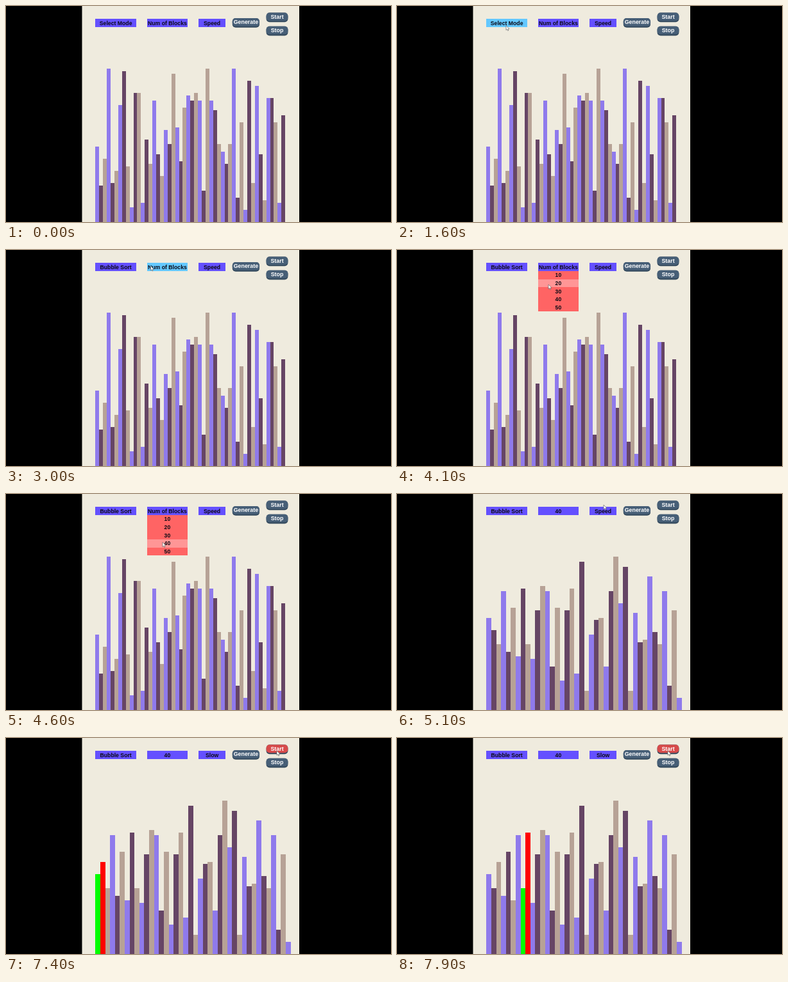
An HTML page with a canvas that plays this animation: 600x338 px, repeating every 8000 ms.

```html
<!DOCTYPE html>
<html lang="en">
<head>
<meta charset="utf-8">
<title>Sorting visualizer</title>
<style>
  html, body { margin: 0; width: 100%; height: 100%; overflow: hidden; background: #000; }
  canvas { display: block; width: 600px; height: 338px; }
</style>
</head>
<body>
<canvas id="stage" width="600" height="338"></canvas>
<script>
const ctx = document.getElementById('stage').getContext('2d');
const LOOP = 8000, FRAME = 100;

// The app is an 800 x 800 window, scaled down and centred on the stage.
const SCALE = 0.4225, LEFT = 118.3;
const px = x => LEFT + x * SCALE;
const py = y => y * SCALE;

const BAR_COLORS = ['#8f7aec', '#664565', '#b7a296'];
const HEADER = ['#6450ff', '#64c8ff'];
const OPTION = ['#ff6464', '#ff9696'];

const fifty = [31, 15, 26, 63, 16, 21, 48, 62, 23, 6, 53, 53, 8, 34, 24, 50, 28,
  19, 38, 32, 61, 39, 25, 47, 52, 50, 53, 50, 13, 63, 50, 46, 32, 29, 24, 32, 63,
  10, 41, 5, 58, 16, 56, 28, 9, 51, 51, 41, 8, 44];
const forty = [38, 33, 27, 49, 24, 42, 22, 50, 27, 21, 41, 51, 49, 18, 42, 12, 41,
  50, 15, 61, 8, 31, 37, 38, 18, 49, 63, 44, 59, 8, 40, 28, 29, 55, 32, 27, 49,
  10, 41, 5];

// open: menu appears; pick: an option is chosen and the menu closes
const menus = [
  { x: 50, w: 150, title: 'Select Mode', choice: 'Bubble Sort', open: 1800, pick: 2400,
    options: ['Bubble Sort', 'Selection Sort', 'Insertion Sort'] },
  { x: 240, w: 150, title: 'Num of Blocks', choice: '40', open: 3300, pick: 4700,
    options: ['10', '20', '30', '40', '50'] },
  { x: 430, w: 100, title: 'Speed', choice: 'Slow', open: 5700, pick: 6600,
    options: ['Slow', 'Medium', 'Fast'] }
];
const MENU_Y = 48, ROW = 30;

const buttons = [
  { x: 555, y: 45, w: 100, label: 'Generate' },
  { x: 680, y: 25, w: 80, label: 'Start', press: 7300 },
  { x: 680, y: 75, w: 80, label: 'Stop' }
];

const SORT_START = 7400, SORT_STEP = 70;

// Pointer path: time, x, y of the tip in stage pixels
const path = [
  [700, 212, 340], [1500, 170, 31], [1800, 170, 30], [2100, 172, 39], [2500, 172, 39],
  [2900, 225, 25], [3300, 227, 25], [3700, 234, 42], [4100, 236, 54], [4500, 244, 75],
  [4700, 244, 76], [5100, 322, 17], [5400, 322, 25], [5800, 322, 25], [6100, 322, 36],
  [6700, 323, 36], [7150, 421, 19], [7400, 422, 20], [LOOP, 422, 20]
];

function pointerAt(t) {
  const i = path.findIndex(p => p[0] > t);
  if (i < 1) return null;
  const [t0, x0, y0] = path[i - 1], [t1, x1, y1] = path[i];
  const k = (t - t0) / (t1 - t0), e = k * k * (3 - 2 * k);
  return { x: x0 + (x1 - x0) * e, y: y0 + (y1 - y0) * e };
}

const over = (p, x, y, w, h) => !!p &&
  p.x >= px(x) && p.x < px(x + w) && p.y >= py(y) && p.y < py(y + h);

function box(x, y, w, h, color) {
  const l = Math.round(px(x)), t = Math.round(py(y));
  ctx.fillStyle = color;
  ctx.fillRect(l, t, Math.round(px(x + w)) - l, Math.round(py(y + h)) - t);
}

function pill(x, y, w, h, color) {
  ctx.fillStyle = color;
  ctx.beginPath();
  ctx.roundRect(px(x), py(y), w * SCALE, h * SCALE, 12 * SCALE);
  ctx.fill();
}

function label(text, cx, cy, size, color) {
  ctx.font = `bold ${size * SCALE}px "Liberation Sans", Arial, sans-serif`;
  ctx.textAlign = 'center';
  ctx.fillStyle = color;
  ctx.fillText(text, px(cx), py(cy + size * 0.35));
}

function drawBars(t) {
  const bars = (t < menus[1].pick ? fifty : forty).slice();
  const step = Math.floor((t - SORT_START) / SORT_STEP);
  for (let j = 0; j <= step; j++) {
    if (bars[j] > bars[j + 1]) [bars[j], bars[j + 1]] = [bars[j + 1], bars[j]];
  }
  const w = bars.length === 50 ? 14 : 18;
  bars.forEach((v, i) => {
    let color = BAR_COLORS[i % 3];
    if (step >= 0 && i === step) color = '#00ff00';
    if (step >= 0 && i === step + 1) color = '#ff0000';
    box(50 + i * w, 800 - v * 9, w, v * 9, color);
  });
}

function drawMenu(m, t, p) {
  const row = (text, y, colors) => {
    box(m.x, y, m.w, ROW, colors[+over(p, m.x, y, m.w, ROW)]);
    label(text, m.x + m.w / 2, y + ROW / 2, 20.6, '#0c0a14');
  };
  row(t < m.pick ? m.title : m.choice, MENU_Y, HEADER);
  if (t >= m.open && t < m.pick) {
    m.options.forEach((o, i) => row(o, MENU_Y + ROW * (i + 1), OPTION));
  }
}

function drawButton(b, t, p) {
  const pressed = t >= b.press && t < b.press + FRAME;
  const y = b.y + (pressed ? 5 : 0);
  pill(b.x, y, b.w, b.y + 35 - y, '#354b5e');
  pill(b.x, y, b.w, 30, over(p, b.x, y, b.w, 30) ? '#d74b4b' : '#475f77');
  label(b.label, b.x + b.w / 2, y + 15, 21, '#fff');
}

function drawPointer({ x, y }) {
  const shape = [[0, 0], [0, 7], [1.6, 5.6], [2.7, 8], [3.8, 7.5], [2.8, 5.2], [5, 5.1]];
  ctx.beginPath();
  shape.forEach(([dx, dy]) => ctx.lineTo(x + dx, y + dy));
  ctx.closePath();
  ctx.fillStyle = '#fff';
  ctx.fill();
  ctx.strokeStyle = '#555';
  ctx.lineWidth = 0.6;
  ctx.stroke();
}

function draw(t) {
  const p = pointerAt(t);
  ctx.fillStyle = '#000';
  ctx.fillRect(0, 0, 600, 338);
  ctx.fillStyle = '#efebde';
  ctx.fillRect(118.5, 0, 338.5, 338);
  drawBars(t);
  buttons.forEach(b => drawButton(b, t, p));
  menus.forEach(m => drawMenu(m, t, p));
  if (p) drawPointer(p);
}

const start = performance.now();
function tick() {
  const t = (performance.now() - start) % LOOP;
  draw(Math.floor(t / FRAME) * FRAME);
  requestAnimationFrame(tick);
}
tick();
</script>
</body>
</html>
```
